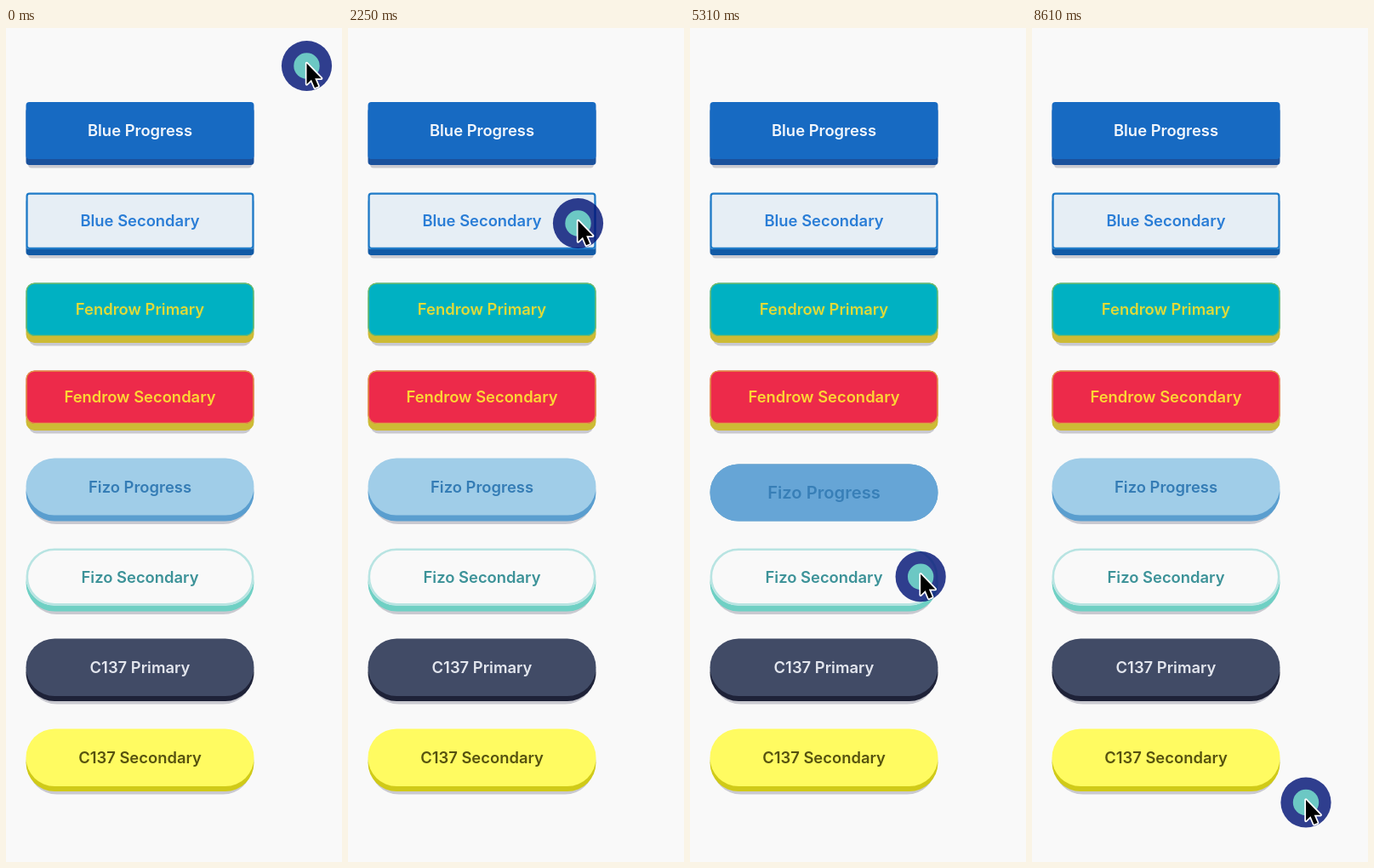
These frames come from a looping animation (395x980 px, 8.64 s). An HTML page:

```html
<!DOCTYPE html>
<html lang="en">
<head>
<meta charset="utf-8">
<title>Buttons</title>
<style>
  html, body { margin: 0; width: 100%; height: 100%; overflow: hidden; background: #f9f9f9; }
  svg { display: block; width: 100vw; height: 100vh; }
  text { font: 600 18.4px Inter, Roboto, sans-serif; text-anchor: middle; }
</style>
</head>
<body>
<svg id="stage" viewBox="0 0 395 980"></svg>
<script>
const LOOP = 8640, LEFT = 23.5, WIDTH = 268, MID = LEFT + WIDTH / 2;
const stage = document.getElementById('stage');

// down/up: mouse press; done: end of progress, for the buttons that have one
const buttons = [
  { label: 'Blue Progress', y: 87, h: 67, d: 7, r: 4, face: '#176ac2', edge: '#1a519c', ink: '#f2f6fb', bar: '#1a58a6', down: 600, up: 880, done: 1800 },
  { label: 'Blue Secondary', y: 193.5, h: 66.5, d: 7, r: 4, face: '#e6eef5', edge: '#115aa6', ink: '#2a7dd6', line: '#1f7bc8', lw: 2.2, down: 2290, up: 2450 },
  { label: 'Fendrow Primary', y: 299.5, h: 62.5, d: 8, r: 10, face: '#00b1c2', edge: '#cdbb35', ink: '#e0da38', line: '#7fba5c', lw: 1.2, down: 2780, up: 2930 },
  { label: 'Fendrow Secondary', y: 402.5, h: 62.5, d: 8, r: 10, face: '#ed2a4a', edge: '#cdbb35', ink: '#fcd635', line: '#dda046', lw: 1.2, down: 3240, up: 3420 },
  { label: 'Fizo Progress', y: 505.5, h: 67, d: 7, r: 33.5, face: '#a0cde8', edge: '#5a9ecf', ink: '#347cb5', bar: '#66a5d6', down: 3920, up: 4180, done: 5220 },
  { label: 'Fizo Secondary', y: 611.5, h: 67, d: 7, r: 33.5, face: '#f9f9f9', edge: '#6fd0c4', ink: '#3c9298', line: '#b8e4e2', lw: 2.6, down: 5360, up: 5530 },
  { label: 'C137 Primary', y: 717.5, h: 67.5, d: 6, r: 33.7, face: '#414b66', edge: '#1e2238', ink: '#e3e6ee', down: 6130, up: 6310 },
  { label: 'C137 Secondary', y: 823.5, h: 67.5, d: 6, r: 33.7, face: '#fffb61', edge: '#d0ca18', ink: '#56520f', down: 6890, up: 7150 }
];

// time, x, y
const path = [
  [30, 353.5, 44.5], [580, 262.5, 133.5], [1200, 262.5, 133.5], [1600, 270, 140], [1900, 270, 140],
  [2200, 270.5, 229.5], [2500, 270.5, 229.5], [2740, 277, 329], [2970, 277, 329],
  [3210, 264.5, 434.5], [3480, 264.5, 434.5], [3860, 272, 540], [4900, 270, 540],
  [5220, 270.5, 644.5], [5640, 276, 646], [6030, 271, 752], [6430, 271, 752],
  [6840, 259.5, 858.5], [7270, 259.5, 858.5], [7740, 322, 910]
];

const clamp = v => Math.max(0, Math.min(1, v));
const ramp = (t, start, length) => clamp((t - start) / length);
const ease = v => v * v * (3 - 2 * v);

function add(parent, tag, attrs) {
  const el = document.createElementNS('http://www.w3.org/2000/svg', tag);
  for (const key in attrs) el.setAttribute(key, attrs[key]);
  return parent.appendChild(el);
}

function box(parent, y, h, r, fill, inset = 0, more = {}) {
  return add(parent, 'rect', { x: LEFT + inset, y, width: WIDTH - 2 * inset, height: h, rx: r, fill, ...more });
}

function build(b, i) {
  const { y, h, d, r, face } = b;
  b.shadow = box(stage, y + d + 3.5, h, r, '#c9c9d0', 2.6);
  box(stage, y + d, h, r, b.edge);
  b.top = add(stage, 'g', {});
  box(b.top, y, h, r, face);
  b.shade = box(b.top, y, h, r, '#000');
  if (b.bar) {
    const clip = add(stage, 'clipPath', { id: 'clip' + i });
    box(clip, y, h, r, '#000');
    b.fill = box(add(b.top, 'g', { 'clip-path': `url(#clip${i})` }), y, h, 0, b.bar);
    b.spinner = add(b.top, 'g', { transform: `translate(${MID - .5} ${y + h / 2 + .5})` });
    b.spokes = Array.from({ length: 12 }, (_, k) => add(b.spinner, 'line', {
      y1: -7, y2: -12, stroke: b.ink, 'stroke-width': 1.9, 'stroke-linecap': 'round', transform: `rotate(${k * 30})`
    }));
  }
  if (b.line) {
    const w = b.lw;
    box(b.top, y + w / 2, h - w, r - w / 2, 'none', w / 2, { stroke: b.line, 'stroke-width': w });
  }
  b.text = add(b.top, 'text', { y: 6.7, fill: b.ink });
  b.text.textContent = b.label;
}

buttons.forEach(build);

const pointer = add(stage, 'g', {});
add(pointer, 'circle', { r: 29.6, fill: 'rgb(0,19,117)', 'fill-opacity': .81 });
const dot = add(pointer, 'circle', { r: 15.2 });
add(pointer, 'path', {
  d: 'M0-3v24.5l5.5-5.2 4 9.4 4.2-1.8-4-9.1h7.5z',
  fill: '#000', stroke: '#fff', 'stroke-width': 3.4, 'paint-order': 'stroke', 'stroke-linejoin': 'round'
});

function drawButton(b, t) {
  const release = b.done ? b.done + 120 : b.up;
  const press = ease(ramp(t, b.down + 40, 110)) * (1 - ease(ramp(t, release, 220)));
  b.top.setAttribute('transform', `translate(0 ${press * b.d})`);
  b.shadow.setAttribute('transform', `translate(0 ${-press * 4})`);
  b.shade.setAttribute('opacity', press * .08);

  let scale = 1, alpha = 1;
  if (b.bar) {
    const start = b.down + 120, since = t - b.done;
    const spin = ramp(t, start, 80) * (1 - ramp(t, b.done - 80, 80));
    alpha = 1 - ramp(t, start, 80);
    if (since >= 0) {
      scale = 1 - Math.exp(-since / 39) * Math.cos(Math.PI * since / 90);
      alpha = ramp(since, 0, 100);
    }
    const done = ease(ramp(t, b.down + 200, b.done - b.down - 240));
    b.fill.setAttribute('width', WIDTH * done);
    b.fill.setAttribute('opacity', 1 - ramp(t, release, 200));
    b.spinner.setAttribute('opacity', spin);
    const head = Math.floor(t * 12 / 1000) - 1;
    b.spokes.forEach((s, k) => s.setAttribute('opacity', 1 - .75 * ((head - k + 24) % 12) / 11));
  }
  b.text.setAttribute('opacity', alpha);
  b.text.setAttribute('transform', `translate(${MID} ${b.y + b.h / 2}) scale(${scale})`);
}

function pointerAt(t) {
  const next = path.findIndex(p => p[0] > t);
  if (next === 0) return path[0].slice(1);
  if (next < 0) return path[path.length - 1].slice(1);
  const a = path[next - 1], b = path[next];
  const k = ease((t - a[0]) / (b[0] - a[0]));
  return [a[1] + (b[1] - a[1]) * k, a[2] + (b[2] - a[2]) * k];
}

function draw(t) {
  buttons.forEach(b => drawButton(b, t));
  pointer.setAttribute('transform', `translate(${pointerAt(t)})`);
  const held = Math.max(...buttons.map(b => ramp(t, b.down, 30) * (1 - ramp(t, b.up, 100))));
  const mix = (from, to) => Math.round(from + (to - from) * held);
  dot.setAttribute('fill', `rgb(${mix(108, 98)},${mix(200, 184)},${mix(196, 220)})`);
}

const begin = performance.now();
function tick() {
  draw((performance.now() - begin) % LOOP);
  requestAnimationFrame(tick);
}
tick();
</script>
</body>
</html>
```
